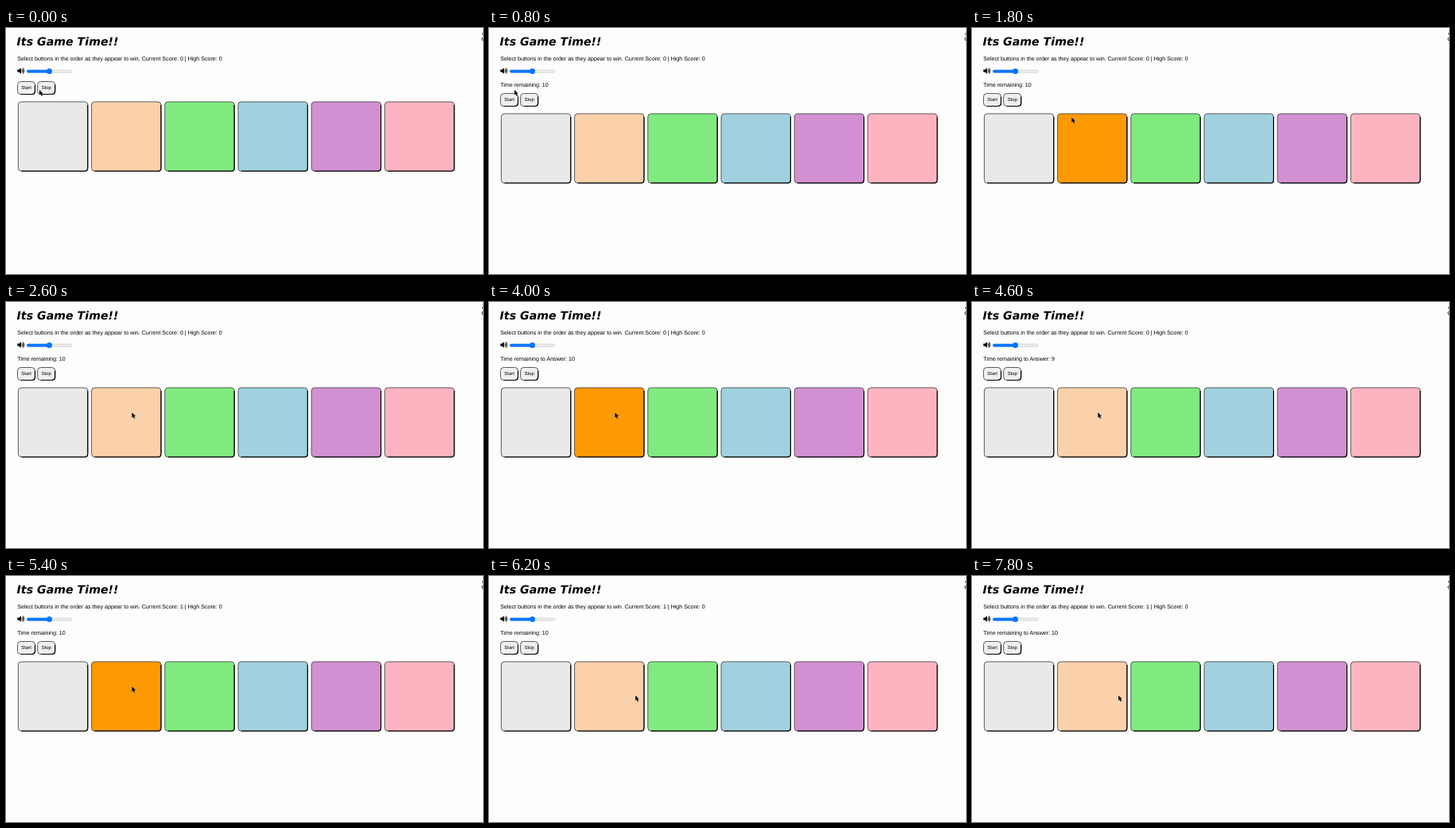
Animation of 600x310 px, one loop 8 s. Source, as an HTML page:

```html
<!DOCTYPE html>
<html lang="en">
<head>
<meta charset="utf-8">
<title>Its Game Time!!</title>
<style>
html, body { margin: 0; width: 100%; height: 100%; overflow: hidden; background: #fdfdfd; }
svg { display: block; width: 600px; height: 310px; }
text { font: 7.12px "Liberation Sans", Arial, sans-serif; text-rendering: geometricPrecision; white-space: pre; }
.title { font: italic bold 14.2px Verdana, "DejaVu Sans", sans-serif; }
.label { font-size: 5.92px; text-anchor: middle; }
.rim { fill: none; stroke: #4a4a4a; stroke-width: .9; }
.shade { fill: none; stroke: #000; stroke-width: 1.2; }
</style>
</head>
<body>
<svg viewBox="0 0 600 310">
  <text class="title" x="13.6" y="21.6">Its Game Time!!</text>
  <text id="score" x="14.2" y="40.8"></text>

  <g id="speaker">
    <path d="M14.3 52.4h2l2.6-2.2v7.6l-2.6-2.2h-2z"/>
    <path d="M19.8 52.4q1.2 1.6 0 3.2M20.7 51.3q2.1 2.7 0 5.4M21.6 50.2q2.9 3.8 0 7.6" fill="none" stroke="#000" stroke-width=".8"/>
  </g>
  <rect x="26.3" y="53" width="56.6" height="3.2" rx="1.6" fill="#efefef" stroke="#b2b2b2" stroke-width=".5"/>
  <rect x="26" y="52.8" width="28.5" height="3.6" rx="1.8" fill="#0075ff"/>
  <circle cx="54.5" cy="54.6" r="3.5" fill="#0075ff"/>

  <path d="M600 6.6l-1 .8 1 .8M600 11.8l-1.5 1.6 1.5 2.8" fill="none" stroke="#111"/>

  <text id="timer" x="14.2" y="73.8"></text>
  <g id="board"></g>
  <path id="cursor" d="M0 0v6.6l1.5-1.4 1.2 2.6 1.3-.6-1.2-2.5h2z" stroke="#fff" stroke-width=".5" paint-order="stroke"/>
</svg>
<script>
const LOOP = 8000, STEP = 200;
const COLORS = ["#e9e9e9", "#fbd1ab", "#80ea80", "#a1d1df", "#d290d2", "#feb4c0"];
const LIT = "#fd9903";
const get = id => document.getElementById(id);

// Outset box: grey rim, darker right and bottom edges
function box(x, y, w, h, r, fill) {
  const right = x + w, bottom = y + h;
  return `<rect x="${x}" y="${y}" width="${w}" height="${h}" rx="${r}" fill="${fill}"/>
    <rect class="rim" x="${x}" y="${y}" width="${w}" height="${h}" rx="${r}"/>
    <path class="shade" d="M${right} ${y + r}V${bottom - r}Q${right} ${bottom} ${right - r} ${bottom}H${x + r}"/>`;
}

function button(x, label) {
  return box(x, 67.5, 22, 16, 4, "#efefef") +
    `<text class="label" x="${x + 11.1}" y="77.4">${label}</text>`;
}

get("board").innerHTML = button(14.5, "Start") + button(39.7, "Stop") +
  COLORS.map((c, i) => `<g class="cell">${box(15.4 + 92.2 * i, 93, 87.4, 87.4, 4, c)}</g>`).join("");
const orange = document.querySelectorAll(".cell")[1].firstElementChild;

// Time, x, y of the pointer tip
const PATH = [
  [0, 42, 78], [200, 32, 78], [1000, 32, 78], [1800, 125.3, 112.5],
  [2600, 158.4, 139.3], [5400, 158.4, 139.3], [6200, 184.2, 150.6], [LOOP, 184.2, 150.6]
];

function pointer(t) {
  const i = PATH.findIndex(p => p[0] > t);
  const [t0, x0, y0] = PATH[i - 1], [t1, x1, y1] = PATH[i];
  const k = (t - t0) / (t1 - t0);
  return [x0 + (x1 - x0) * k, y0 + (y1 - y0) * k];
}

function timerText(t) {
  if (t < 600) return "";
  if (t >= 3200 && t < 5000) return "Time remaining to Answer: " + (t < 4200 ? 10 : 9);
  return t >= 7800 ? "Time remaining to Answer: 10" : "Time remaining: 10";
}

const within = (t, from, to) => t >= from && t < to;

function draw(now) {
  const t = Math.floor(now % LOOP / STEP) * STEP;
  const lit = within(t, 1600, 2400) || within(t, 4000, 4600) || within(t, 5400, 6200);
  get("score").textContent = "Select buttons in the order as they appear to win. Current Score: " +
    (t < 5000 ? 0 : 1) + " | High Score: 0";
  get("timer").textContent = timerText(t);
  get("board").setAttribute("transform", `translate(0 ${t < 600 ? 0 : 15})`);
  orange.setAttribute("fill", lit ? LIT : COLORS[1]);
  get("cursor").setAttribute("transform", `translate(${pointer(t)})`);
}

const start = performance.now();
function tick() {
  draw(performance.now() - start);
  requestAnimationFrame(tick);
}
tick();
</script>
</body>
</html>
```
